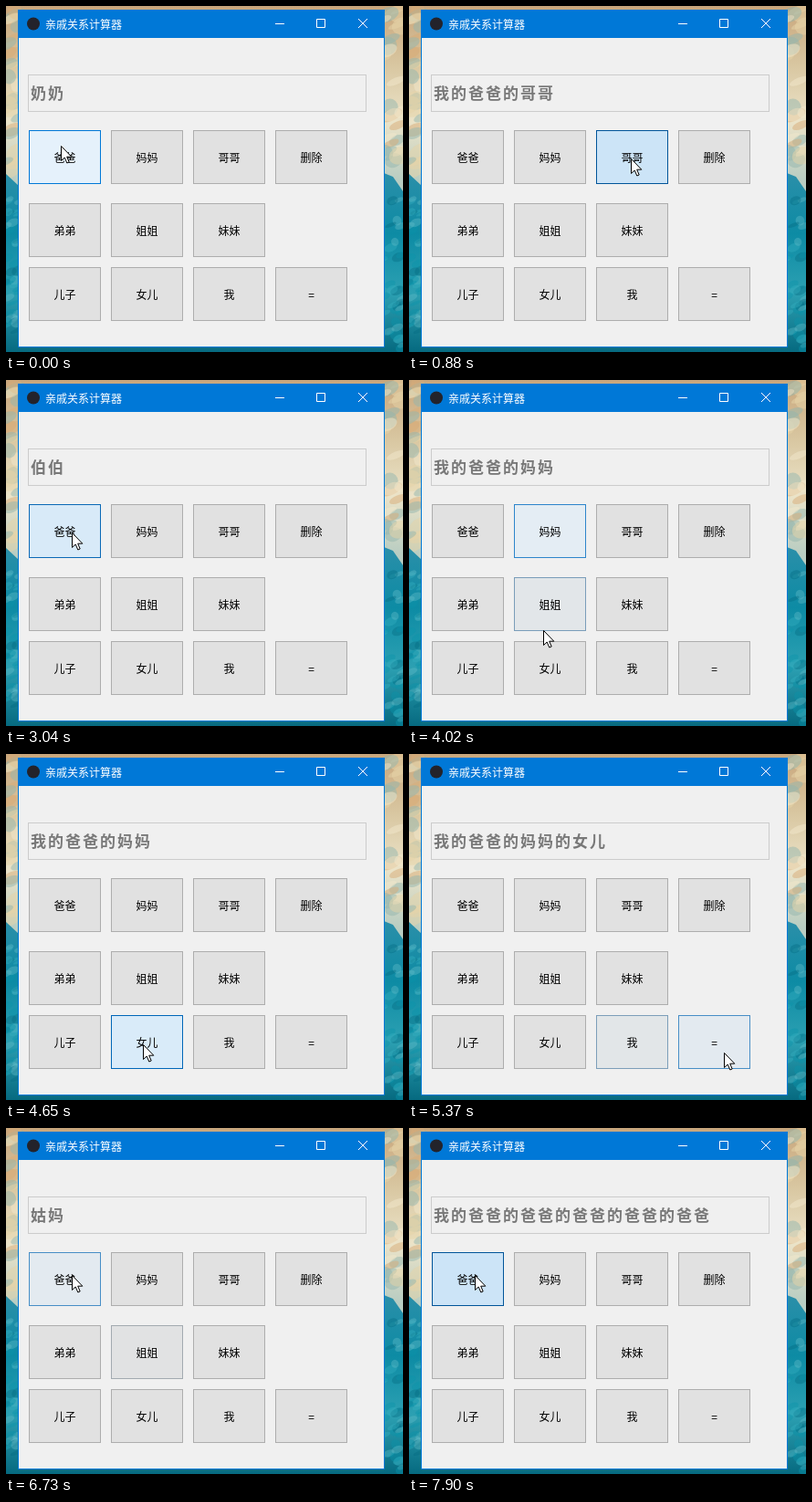
An HTML page with a canvas for the animation above (7990 ms loop, 435 by 379 pixels).

```html
<!DOCTYPE html>
<html lang="zh-CN">
<head>
<meta charset="utf-8">
<title>亲戚关系计算器</title>
<style>
html, body { margin: 0; width: 100%; height: 100%; overflow: hidden; }
body { position: relative; font: 12px "Noto Sans CJK SC", "Noto Sans CJK", sans-serif; }
canvas, svg, div { position: absolute; box-sizing: border-box; }
canvas, svg { left: 0; top: 0; }
#title { left: 43px; top: 4px; line-height: 31px; color: #fff; white-space: nowrap; }
#field { left: 24px; top: 75px; width: 371px; height: 41px; border: 1px solid #ccc;
  padding-left: 2px; font-size: 17px; font-weight: 700; letter-spacing: 2px;
  line-height: 37px; color: #787878; white-space: nowrap; }
.key { width: 79px; height: 59px; border: 1px solid; line-height: 58px; text-align: center; color: #000; }
</style>
</head>
<body>
<canvas id="wall" width="435" height="379"></canvas>
<svg width="435" height="379">
  <path fill="#0078d7" d="M13 4H415V374H13Z"/>
  <path fill="#f0f0f0" d="M14 35H414V373H14Z"/>
  <circle cx="30" cy="19.5" r="7" fill="#23232b"/>
  <path fill="none" stroke="#fff" d="M295 19.5H305M340.5 14.5H349.5V23.5H340.5ZM386 14L396 24M396 14L386 24"/>
</svg>
<div id="title">亲戚关系计算器</div>
<div id="field"></div>
<svg id="cursor" width="14" height="21">
  <path fill="#fff" stroke="#000" d="M.5 .5V16.5L4.2 13L6.8 19L9.2 18L6.7 12.2H11.8Z"/>
</svg>
<script>
const LOOP = 7990, TICKS = 90, STEP = LOOP / TICKS, LEAD = 25;
const HOLD = 265, REST = 180;
const ROWS = [["爸爸", "妈妈", "哥哥", "删除"], ["弟弟", "姐姐", "妹妹"], ["儿子", "女儿", "我", "="]];
const TOPS = [136, 216, 286];
const KIN = { "我的爸爸的哥哥": "伯伯", "我的爸爸的妈妈的女儿": "姑妈" };

// fill rgb, border rgb
const LOOKS = {
  idle: [225, 225, 225, 173, 173, 173],
  hover: [229, 241, 251, 0, 120, 215],
  down: [204, 228, 247, 0, 84, 153]
};

// key to visit, aim relative to its centre, travel time, click times
const VISITS = [
  { key: "爸爸", aim: [-4, -12], travel: 0, clicks: [170] },
  { key: "哥哥", aim: [-1, 2], travel: 450, clicks: [880] },
  { key: "=", aim: [6, 13], travel: 720, clicks: [2040] },
  { key: "爸爸", aim: [8, 2], travel: 540, clicks: [3190] },
  { key: "妈妈", aim: [-13, 5], travel: 260, clicks: [3740] },
  { key: "女儿", aim: [-4, 3], travel: 400, clicks: [4720] },
  { key: "=", aim: [11, 12], travel: 600, clicks: [5920] },
  { key: "爸爸", aim: [8, -4], travel: 540, clicks: [7000, 7360, 7540, 7720, 7900] }
];

const field = document.getElementById("field");
const cursor = document.getElementById("cursor");
const mix = (a, b, p) => a + (b - a) * p;
const ease = p => p * p * (3 - 2 * p);
const clamp = p => Math.max(0, Math.min(1, p));
const rgb = c => `rgb(${c.map(Math.round)})`;

function paintWall() {
  const g = document.getElementById("wall").getContext("2d");
  let seed = 7;
  const rnd = () => (seed = seed * 16807 % 2147483647) / 2147483647;
  const blobs = (count, top, bottom, size, colors) => {
    for (let i = 0; i < count; i++) {
      const x = i % 2 ? rnd() * 14 : 414 + rnd() * 21;
      g.fillStyle = colors[Math.floor(rnd() * colors.length)];
      g.beginPath();
      g.ellipse(x, mix(top, bottom, rnd()), size * (1 + rnd()), size * (.4 + rnd()), -.4, 0, 7);
      g.fill();
    }
  };
  const sky = g.createLinearGradient(0, 0, 0, 190);
  ["#c9a67c", "#d8c6a0", "#ebe3c8", "#b9cdc2"].forEach((c, i) => sky.addColorStop(i / 3, c));
  g.fillStyle = sky;
  g.fillRect(0, 0, 435, 379);
  g.globalAlpha = .5;
  blobs(50, 0, 180, 7, ["#f2e8cc", "#d8ab78", "#94b5ae", "#e6d3a8"]);
  g.globalAlpha = 1;
  const hill = g.createLinearGradient(0, 184, 0, 379);
  ["#2a8fa9", "#0d8ba4", "#2ca0b2", "#066a80"].forEach((c, i) => hill.addColorStop(i / 3, c));
  g.fillStyle = hill;
  g.fill(new Path2D("M0 184L14 197L414 183L424 187L435 203V379H0Z"));
  g.globalAlpha = .4;
  blobs(70, 205, 379, 4, ["#35b0c0", "#066b82", "#0a93aa", "#62bcc8"]);
}

function makeKeys() {
  return ROWS.flatMap((row, r) => row.map((label, c) => {
    const x = 25 + 90 * c, y = TOPS[r], el = document.createElement("div");
    el.className = "key";
    el.textContent = label;
    el.style.left = x + "px";
    el.style.top = y + "px";
    document.body.insertBefore(el, cursor);
    return { label, x, y, el, state: "idle", from: LOOKS.idle, start: 0, length: 1 };
  }));
}

paintWall();
const keys = makeKeys();

// The pointer leaves a key after its last click, and lingers on "=" to show the answer.
let leave = 0;
for (const v of VISITS) {
  const k = keys.find(k => k.label === v.key);
  v.spot = [k.x + 39 + v.aim[0], k.y + 29 + v.aim[1]];
  v.leave = leave;
  leave = v.clicks[v.clicks.length - 1] + (v.key === "=" ? REST : 0);
}
const clicks = VISITS.flatMap(v => v.clicks.map(time => ({ time, key: v.key })));

function pointer(t) {
  const i = VISITS.filter(v => v.leave <= t).length - 1;
  const to = VISITS[i], from = VISITS[Math.max(0, i - 1)];
  const p = to.travel ? ease(clamp((t - to.leave) / to.travel)) : 1;
  return to.spot.map((v, n) => Math.round(mix(from.spot[n], v, p)));
}

function textAt(t) {
  let text = "奶奶", done = true;
  for (const { time, key } of clicks) {
    if (time > t) break;
    const start = done ? "我" : text;
    done = key === "=";
    text = done ? KIN[text] : start + "的" + key;
  }
  return text;
}

function stateOf(k, t, [x, y]) {
  if (x < k.x || x >= k.x + 79 || y < k.y || y >= k.y + 59) return "idle";
  return clicks.some(c => t >= c.time - HOLD && t < c.time) ? "down" : "hover";
}

function fadeTime(from, to) {
  if (to === "idle") return 340;
  if (to === "down") return 180;
  return from === "down" ? 90 : 300;
}

function lookAt(k, t) {
  const p = clamp((t - k.start) / k.length);
  return k.from.map((v, i) => mix(v, LOOKS[k.state][i], p));
}

// Every tick is worked out once, so playback depends on the time alone.
keys[0].state = "hover";
keys[0].from = LOOKS.hover;
const ticks = Array.from({ length: TICKS }, (_, n) => {
  const t = n * STEP, pos = pointer(t);
  const looks = keys.map(k => {
    const look = lookAt(k, t), state = stateOf(k, t, pos);
    if (state !== k.state) {
      Object.assign(k, { from: look, start: t, length: fadeTime(k.state, state), state });
    }
    return look;
  });
  return { pos, looks, text: textAt(t) };
});

function draw({ pos, looks, text }) {
  field.textContent = text;
  cursor.style.transform = `translate(${pos[0]}px, ${pos[1]}px)`;
  keys.forEach((k, i) => {
    k.el.style.backgroundColor = rgb(looks[i].slice(0, 3));
    k.el.style.borderColor = rgb(looks[i].slice(3));
  });
}

const origin = performance.now();
let shown = -1;
function loop() {
  const t = (performance.now() - origin) % LOOP;
  const n = Math.min(TICKS - 1, Math.floor((t + LEAD) / STEP));
  if (n !== shown) draw(ticks[shown = n]);
  requestAnimationFrame(loop);
}
loop();
</script>
</body>
</html>
```
